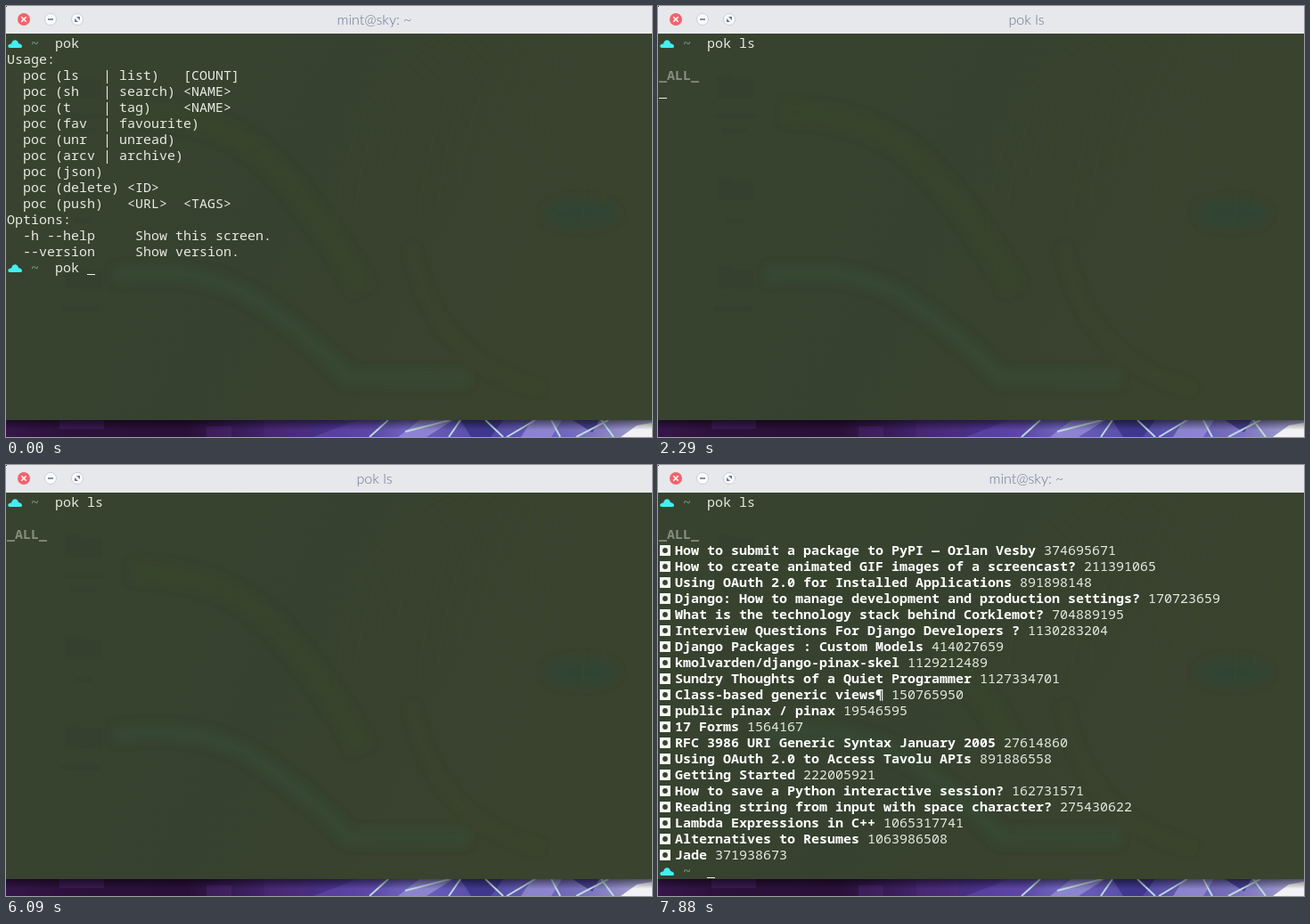
These frames come from a looping animation (725 by 484 pixels, 8000 ms). An HTML page:

```html
<!DOCTYPE html>
<html lang="en">
<head>
<meta charset="utf-8">
<title>Terminal</title>
<style>
  html, body { margin: 0; width: 100%; height: 100%; overflow: hidden; background: #37422f; }
  svg { display: block; width: 725px; height: 484px; }
  text { white-space: pre; }
  .mono { font: 15px "Noto Sans Mono", "Liberation Mono", monospace; fill: #e6eae1; }
  .b { font-weight: 700; fill: #fff; }
  .dim { font-weight: 700; fill: #858e7f; }
  .tilde { font-weight: 700; fill: #709176; }
  #title { font: 300 16px Lato, "Open Sans", sans-serif; fill: #6c7190; text-anchor: middle; }
</style>
</head>
<body>
<svg viewBox="0 0 725 484" xmlns="http://www.w3.org/2000/svg">
  <defs>
    <linearGradient id="back" x2="1" y2="0.3">
      <stop offset="0" stop-color="#38432f"/>
      <stop offset="0.5" stop-color="#36412f"/>
      <stop offset="1" stop-color="#3a432e"/>
    </linearGradient>
    <linearGradient id="wall">
      <stop offset="0" stop-color="#35164a"/>
      <stop offset="0.1" stop-color="#2c113b"/>
      <stop offset="0.28" stop-color="#2a1038"/>
      <stop offset="0.4" stop-color="#40236a"/>
      <stop offset="0.52" stop-color="#4b3590"/>
      <stop offset="0.62" stop-color="#6e62bd"/>
      <stop offset="0.75" stop-color="#544aa5"/>
      <stop offset="0.9" stop-color="#7a72bd"/>
      <stop offset="1" stop-color="#aaa9cf"/>
    </linearGradient>
    <linearGradient id="shade" x2="0" y2="1">
      <stop offset="0" stop-color="#000" stop-opacity=".5"/>
      <stop offset="1" stop-color="#000" stop-opacity="0"/>
    </linearGradient>
    <filter id="soft" x="-20%" y="-20%" width="140%" height="140%"><feGaussianBlur stdDeviation="5"/></filter>
    <clipPath id="strip"><rect y="465" width="725" height="19"/></clipPath>
    <clipPath id="pane"><rect y="31" width="725" height="434"/></clipPath>
  </defs>

  <g clip-path="url(#strip)">
    <rect y="465" width="725" height="19" fill="url(#wall)"/>
    <path d="M60 465h50v10h-50zM225 472h28v12h-28zM290 465h48v19h-48z" fill="#54307c" opacity=".35"/>
    <path d="M345 484l50-19h26l-14 19z" fill="#6046a8" opacity=".7"/>
    <path d="M440 484l24-19h38l-30 19zM590 465h34l-12 19h-34z" fill="#9891d6" opacity=".75"/>
    <path d="M510 465h48l-14 19h-22zM636 465h30l-8 14z" fill="#373184" opacity=".75"/>
    <path d="M690 484l18-13 17-3v16z" fill="#f2f2f6"/>
    <path d="M408 484l21-19M448 478l50-13M497 484l13-19M538 465l20 19M562 484l32-19M612 465l10 19M640 484l36-19M668 465l14 19"
      fill="none" stroke="#bcd9e0" stroke-width="2"/>
    <rect y="465" width="725" height="11" fill="url(#shade)"/>
  </g>

  <rect y="31" width="725" height="434" fill="url(#back)"/>
  <g clip-path="url(#pane)">
    <g filter="url(#soft)" fill="none">
      <path d="M120 303Q220 290 280 330T385 418H520" stroke="#344b34" stroke-width="20" opacity=".55"/>
      <path d="M140 120Q250 120 310 190T400 320" stroke="#3b472c" stroke-width="26" opacity=".5"/>
      <ellipse cx="645" cy="233" rx="42" ry="17" fill="#314432" opacity=".8"/>
      <path d="M455 270Q480 400 600 430" stroke="#3d472e" stroke-width="10" opacity=".6"/>
    </g>
    <g id="hair" fill="none" stroke="#3d482d" stroke-width="3" opacity=".45"/>
    <g fill="#334030" opacity=".45">
      <path d="M66 78h16l4 4h22v22H66zM66 192h16l4 4h22v22H66zM66 292h16l4 4h22v22H66z"/>
      <path d="M64 121h46v6H64zM72 137h28v6H72zM77 238h20v6H77zM62 337h44v6H62z"/>
    </g>
  </g>

  <rect width="725" height="31" fill="#e7e8eb"/>
  <rect width="1" height="1" fill="#333"/>
  <circle cx="20" cy="15" r="7" fill="#f0646c"/>
  <path d="M17.3 12.3l5.4 5.4M22.7 12.3l-5.4 5.4" stroke="#fff" stroke-width="1.5"/>
  <g fill="#fafbfd" stroke="#c9cddc"><circle cx="50" cy="15" r="6.5"/><circle cx="80" cy="15" r="6.5"/></g>
  <path d="M47 15h6" stroke="#6c7391" stroke-width="1.6"/>
  <path d="M79 12h4v4zM77 14v4h4z" fill="#6c7391"/>
  <text id="title" x="413.5" y="21"></text>

  <g id="usage" class="mono"></g>
  <g id="cmd" class="mono"></g>
  <g id="all" class="mono"></g>
  <g id="list" class="mono"></g>
  <rect id="cursor" width="9" height="1" fill="#edf1e9"/>
</svg>
<script>
const NS = "http://www.w3.org/2000/svg";
const LOOP = 8000, CELL = 9, LINE = 18;
const $ = id => document.getElementById(id);
const colX = c => 1 + c * CELL;
const rowY = r => 47 + r * LINE;

function add(parent, tag, attrs, text) {
  const el = document.createElementNS(NS, tag);
  for (const k in attrs) el.setAttribute(k, attrs[k]);
  if (text !== undefined) el.textContent = text;
  return parent.appendChild(el);
}
const write = (g, row, col, text, cls = "") =>
  add(g, "text", { x: colX(col), y: rowY(row), class: cls }, text);

function prompt(g, row, text) {
  const y = rowY(row);
  add(g, "path", {
    d: `M4 ${y}Q1.5 ${y - 1} 2.5 ${y - 3}Q4 ${y - 5} 6 ${y - 4.5}Q7.5 ${y - 9.5} 11.5 ${y - 8.5}` +
       `Q14 ${y - 7.5} 14 ${y - 5}Q18 ${y - 4.5} 18 ${y - 1.5}Q18 ${y} 16 ${y}Z`,
    fill: "#42eff2"
  });
  write(g, row, 3, "~", "tilde");
  return write(g, row, 6, text);
}

const HELP = `Usage:
  poc (ls   | list)   [COUNT]
  poc (sh   | search) <NAME>
  poc (t    | tag)    <NAME>
  poc (fav  | favourite)
  poc (unr  | unread)
  poc (arcv | archive)
  poc (json)
  poc (delete) <ID>
  poc (push)   <URL>  <TAGS>
Options:
  -h --help     Show this screen.
  --version     Show version.`;

const ITEMS = `How to submit a package to PyPI — Orlan Vesby 374695671
How to create animated GIF images of a screencast? 211391065
Using OAuth 2.0 for Installed Applications 891898148
Django: How to manage development and production settings? 170723659
What is the technology stack behind Corklemot? 704889195
Interview Questions For Django Developers ? 1130283204
Django Packages : Custom Models 414027659
kmolvarden/django-pinax-skel 1129212489
Sundry Thoughts of a Quiet Programmer 1127334701
Class-based generic views¶ 150765950
public pinax / pinax 19546595
17 Forms 1564167
RFC 3986 URI Generic Syntax January 2005 27614860
Using OAuth 2.0 to Access Tavolu APIs 891886558
Getting Started 222005921
How to save a Python interactive session? 162731571
Reading string from input with space character? 275430622
Lambda Expressions in C++ 1065317741
Alternatives to Resumes 1063986508
Jade 371938673`;

// faint strands of the backdrop
for (let i = 0; i < 15; i++) {
  const x = 370 + i * 23;
  add($("hair"), "path", { d: `M${500 + i * 12} 31Q${x + 15} ${75 + i * 3} ${x} ${250 - i % 4 * 25}` });
}

prompt($("usage"), 0, "pok");
HELP.split("\n").forEach((s, i) => write($("usage"), i + 1, 0, s));
const typed = prompt($("usage"), 14, "pok ");
prompt($("cmd"), 0, "pok ls");
write($("all"), 2, 0, "_ALL_", "dim");
ITEMS.split("\n").forEach((s, i) => {
  const row = i + 3, cut = s.lastIndexOf(" "), y = rowY(row), g = $("list");
  add(g, "rect", { x: 2, y: y - 11, width: 12, height: 12, fill: "#f4f6f1" });
  add(g, "circle", { cx: 8, cy: y - 5, r: 2.9, fill: "#37422f" });
  write(g, row, 2, s.slice(0, cut), "b");
  write(g, row, 3 + cut, s.slice(cut + 1));
});
prompt($("list"), 23, "");

const show = (id, on) => $(id).setAttribute("visibility", on ? "visible" : "hidden");
const blink = (t, start) => Math.floor((t - start) / 200) % 2 === 0;

// column, row and visibility of the cursor
function cursorAt(t) {
  if (t < 70) return [10, 14, true];
  if (t < 190) return [11, 14, true];
  if (t < 1240) return [12, 14, blink(t, 190)];
  if (t < 1530) return [12, 14, true];
  if (t < 1890) return [12, 0, t < 1680];
  if (t < 2190) return [0, 1, blink(t, 1890)];
  if (t < 7740) return [0, 3, blink(t, 1890)];
  return [6, 23, t >= 7780];
}

function draw(t) {
  const cleared = t >= 1530;
  typed.textContent = t < 70 ? "pok " : t < 190 ? "pok l" : "pok ls";
  show("usage", !cleared);
  show("cmd", cleared);
  show("all", t >= 2190);
  show("list", t >= 7740);
  $("title").textContent = t >= 1930 && t < 7880 ? "pok ls" : "mint@sky: ~";
  const [c, r, on] = cursorAt(t);
  $("cursor").setAttribute("x", colX(c));
  $("cursor").setAttribute("y", rowY(r) + 2);
  show("cursor", on);
}

const start = performance.now();
function tick() {
  draw((performance.now() - start) % LOOP);
  requestAnimationFrame(tick);
}
draw(0);
requestAnimationFrame(tick);
</script>
</body>
</html>
```
